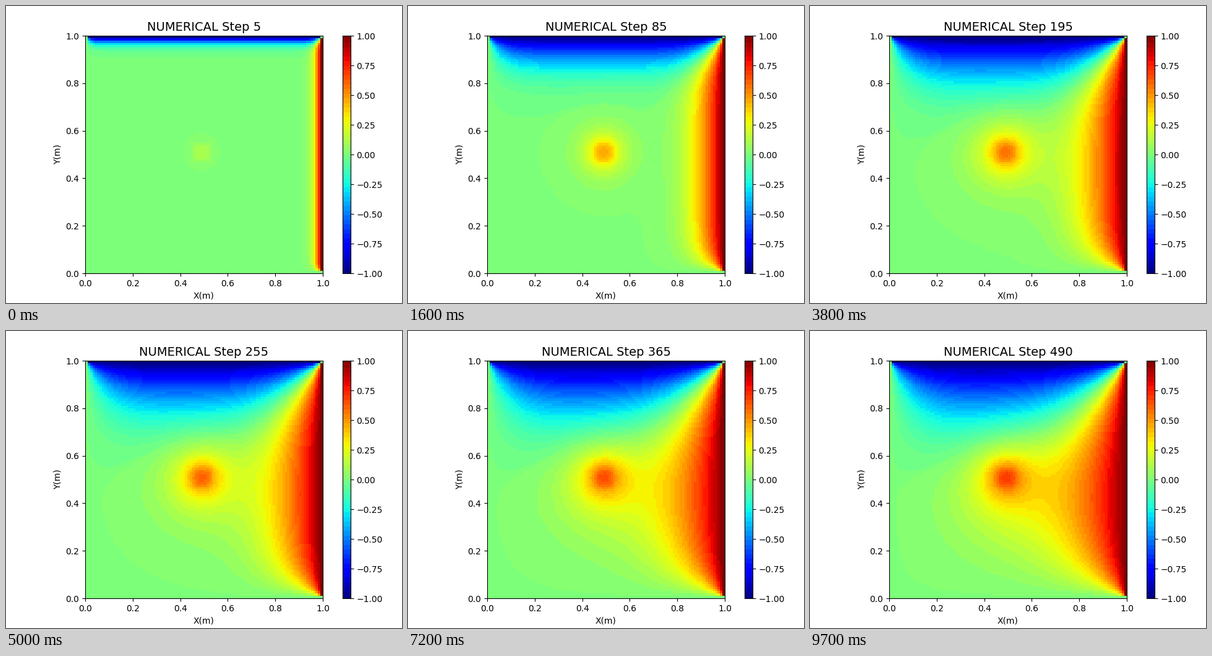
These frames come from a looping animation (640 by 480 pixels, 9.8 s). A matplotlib script:

```python
import numpy as np
import matplotlib.pyplot as plt
from matplotlib.animation import FuncAnimation

N = 100                 # cells per side
FRAMES = 98
STEPS_PER_FRAME = 5
SUBSTEPS = 4            # keeps the explicit scheme stable
DIFFUSION = 0.87        # alpha * dt / dx**2 for one step
HEAT = 0.025            # heating of the central block per step
BLOCK = slice(45, 53)
ZERO_BAND = 0.0042      # half width of the neutral colour band
BAND = 0.0392           # width of every other colour band

plt.rcParams["font.family"] = "DejaVu Sans"


def advance(u):
    """Advance the temperature field by one time step."""
    for _ in range(SUBSTEPS):
        lap = (u[:-2, 1:-1] + u[2:, 1:-1] + u[1:-1, :-2] + u[1:-1, 2:]
               - 4 * u[1:-1, 1:-1])
        u[1:-1, 1:-1] += DIFFUSION / SUBSTEPS * lap
        u[BLOCK, BLOCK] += HEAT / SUBSTEPS


def solve():
    """Return the field for every frame."""
    u = np.zeros((N, N))
    u[0, 1:-1] = -1
    u[1:-1, -1] = 1
    fields = []
    for _ in range(FRAMES):
        for _ in range(STEPS_PER_FRAME):
            advance(u)
        fields.append(u.copy())
    return fields


def banded(v):
    """Snap values to the middle of their colour band."""
    k = np.maximum(np.ceil((np.abs(v) - ZERO_BAND) / BAND), 0)
    mid = np.where(k > 0, ZERO_BAND + (k - 0.5) * BAND, 0)
    return np.sign(v) * np.minimum(mid, 1)


fields = solve()
style = dict(cmap="jet", vmin=-1, vmax=1, interpolation="nearest",
             aspect="auto")

fig = plt.figure(figsize=(6.4, 4.8), dpi=100)
ax = fig.add_axes([0.2, 0.1, 0.6, 0.8])
image = ax.imshow(banded(fields[0]), extent=(0, 1, 0, 1), **style)
ticks = np.linspace(0, 1, 6)
ax.set_xticks(ticks)
ax.set_yticks(ticks)
ax.set_xlabel("X(m)")
ax.set_ylabel("Y(m)")
title = ax.set_title("", fontsize=14)

bar = fig.add_axes([0.85, 0.1, 0.02, 0.8])
scale = np.linspace(1, -1, 512)[:, None]
bar.imshow(banded(scale), extent=(0, 1, -1, 1), **style)
bar.set_xticks([])
bar.yaxis.tick_right()
bar.set_yticks(np.linspace(-1, 1, 9))


def draw(i):
    image.set_data(banded(fields[i]))
    title.set_text(f"NUMERICAL Step {(i + 1) * STEPS_PER_FRAME}")
    return image, title


anim = FuncAnimation(fig, draw, frames=FRAMES, interval=100, repeat=True)
plt.show()
```
